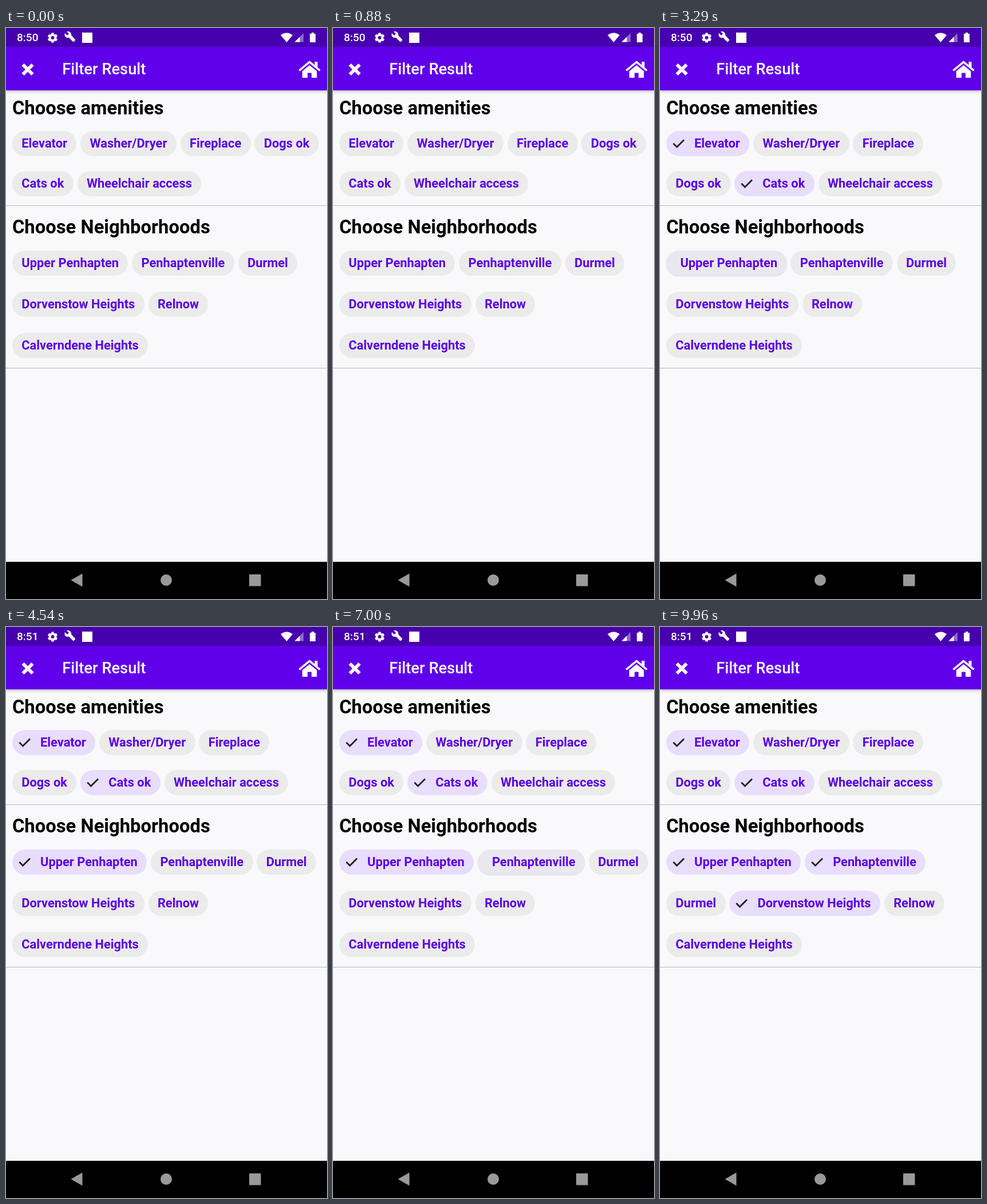
An HTML page for the animation above (10 s loop, 561x998 px).

```html
<!DOCTYPE html>
<html lang="en">
<head>
<meta charset="utf-8">
<title>Filter Result</title>
<style>
  html, body { margin: 0; width: 100%; height: 100%; overflow: hidden; }
  body { font-family: Roboto, sans-serif; background: #f9f9fb; }
  #stage { position: relative; width: 561px; height: 998px; overflow: hidden; }
  #stage > * { position: absolute; margin: 0; white-space: nowrap; }
  .status { left: 0; top: 0; width: 561px; height: 33px; background: #4700ae; }
  .bar { left: 0; top: 33px; width: 561px; height: 76px; background: #6000ea; box-shadow: 0 2px 5px rgba(0, 0, 0, .25); }
  .nav { left: 0; top: 933px; width: 561px; height: 65px; background: #000; }
  #clock { left: 19px; top: 5px; font: 500 19px/24px Roboto, sans-serif; color: #fff; }
  h1 { left: 98.3px; top: 52px; font: 500 27.3px/40px Roboto, sans-serif; color: #fff; }
  h2 { left: 10.9px; font: 700 32.77px/40px Roboto, sans-serif; color: #000; }
  hr { left: 0; width: 561px; height: 1px; border: 0; background: #b4b7bb; }
  .icons { left: 0; top: 0; }
  .chips { left: 10.9px; width: 540px; display: flex; flex-wrap: wrap; column-gap: 6.8px; align-content: flex-start; }
  .chip {
    --s: 0; --p: 0;
    position: relative; box-sizing: border-box; height: 43.7px; border-radius: 22px;
    padding: 0 16.4px 0 calc(16.4px + 32.77px * var(--s));
    font: 700 21.84px/43.7px Roboto, sans-serif; color: #5b00e6;
    background: color-mix(in srgb, #e8ddfd calc(var(--s) * 100%), #ebebeb);
    box-shadow: 0 calc(3px * var(--p)) calc(5px * var(--p)) rgba(0, 0, 0, calc(.38 * var(--p)));
  }
  .chip svg { position: absolute; left: 0; top: 0; }
  .chip path { fill: none; stroke: #202020; stroke-width: 2.8; stroke-dasharray: 1 2; }
</style>
</head>
<body>
<div id="stage">
  <div class="bar"></div>
  <div class="status"></div>
  <div class="nav"></div>
  <div id="clock">8:50</div>
  <h1>Filter Result</h1>
  <h2 style="top:119.5px">Choose amenities</h2>
  <div class="chips" id="amenities" style="top:180.2px;row-gap:26px"></div>
  <hr style="top:310px">
  <h2 style="top:328px">Choose Neighborhoods</h2>
  <div class="chips" id="areas" style="top:389px;row-gap:28.5px"></div>
  <hr style="top:594px">
  <svg class="icons" width="561" height="998" fill="#fff">
    <g transform="translate(81.5 17)" fill="none" stroke="#fff">
      <circle r="4.9" stroke-width="4"/>
      <path d="M0-8.6V-6M0 8.6V6M-7.4-4.3L-5.2-3M7.4 4.3L5.2 3M-7.4 4.3L-5.2 3M7.4-4.3L5.2-3" stroke-width="4.4"/>
    </g>
    <path d="M103 9l4 4 3-3-4-3.6c4-1.6 8.600 1 8.200 6.600l6.400 6.800q1 1.200 0 2.200l-1.700 1.700q-1 .8-2 0l-6.900-6.900c-5 1.600-9.200-3-7-7.800z"/>
    <rect x="133" y="8" width="18" height="18"/>
    <path d="M480 12.500Q490.500 4.500 501 12.500L490.500 25z"/>
    <path d="M520 9v15.500h-15.500z" opacity=".4"/>
    <path d="M513.500 15.500v9h-9z"/>
    <path d="M531 10h3V8h4v2h3v15h-10z"/>
    <path d="M29.500 64l17 17m0-17l-17 17" stroke="#fff" stroke-width="6"/>
    <path d="M513.500 73.500l17-14.200 17 14.200" fill="none" stroke="#fff" stroke-width="3.500" stroke-linecap="round" stroke-linejoin="round"/>
    <path d="M539.500 59h5v10l-5-4.200zM530.500 65l12.800 10.600V87h-9.300v-8.500h-7V87h-9.300V75.600z"/>
    <g fill="#999">
      <path d="M113.500 965l20-11.500v23z"/>
      <circle cx="280" cy="965" r="10"/>
      <rect x="425" y="955" width="20.500" height="20.500" rx="1"/>
    </g>
  </svg>
</div>
<script>
  const LOOP = 10000, STEP = 1000 / 24, NEVER = Infinity;
  const clock = document.getElementById('clock');

  // name, time of selection, end of a press that selects nothing
  const groups = {
    amenities: [['Elevator', 1300], ['Washer/Dryer'], ['Fireplace'], ['Dogs ok'], ['Cats ok', 2250], ['Wheelchair access']],
    areas: [['Upper Penhapten', 3243], ['Penhaptenville', 6950], ['Durmel'],
            ['Dorvenstow Heights', 8900, 6000], ['Relnow'], ['Calverndene Heights']]
  };

  const clamp = x => Math.min(1, Math.max(0, x));
  const ease = x => x * x * (3 - 2 * x);
  const press = (t, up) => Math.min(clamp((t - up + 150) / 60), clamp(1 - (t - up) / 75));

  function makeChip(parent, [name, selectAt = NEVER, cancelAt = NEVER]) {
    const el = document.createElement('div');
    el.className = 'chip';
    el.innerHTML = `<svg width="44" height="44"><path pathLength="1" d="M12.300 21.800L18.500 28L31 15.500"/></svg>${name}`;
    document.getElementById(parent).append(el);
    return { el, tick: el.querySelector('path'), selectAt, cancelAt };
  }

  const chips = Object.entries(groups).flatMap(([id, list]) => list.map(item => makeChip(id, item)));

  function render(t) {
    clock.textContent = t < 4500 ? '8:50' : '8:51';
    for (const { el, tick, selectAt, cancelAt } of chips) {
      const drawn = clamp((t - selectAt - 70) / 125);
      el.style.setProperty('--s', ease(clamp((t - selectAt) / 150)));
      el.style.setProperty('--p', Math.max(press(t, selectAt), press(t, cancelAt)));
      tick.style.strokeDashoffset = 1 - drawn;
      tick.style.visibility = drawn ? 'visible' : 'hidden';
    }
  }

  const start = performance.now();
  function frame() {
    const t = (performance.now() - start) % LOOP;
    render(Math.floor(t / STEP + 0.2) * STEP);
    requestAnimationFrame(frame);
  }
  frame();
</script>
</body>
</html>
```
